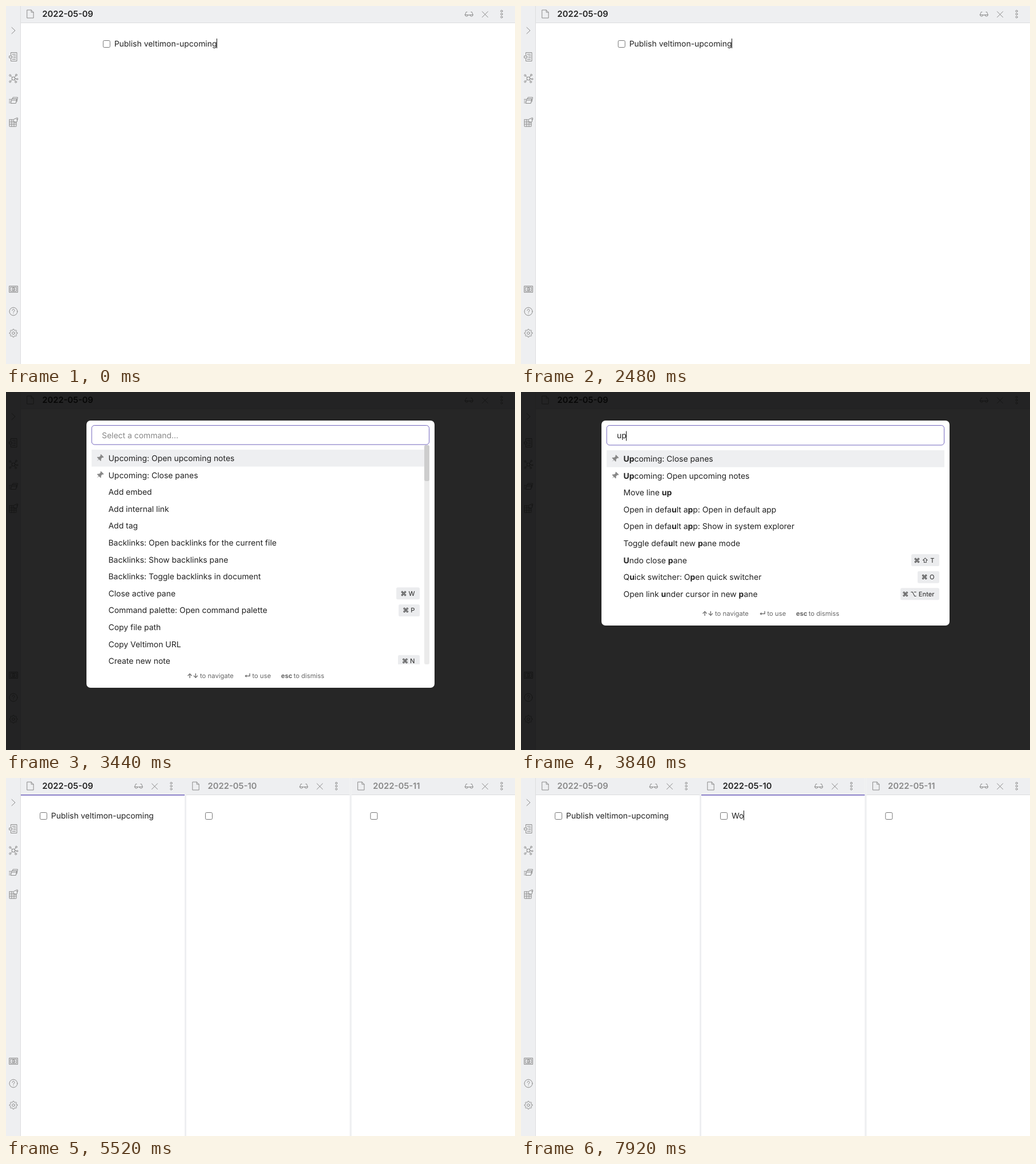
Recreate the animation shown at these times as an HTML page. Size 892 by 627 pixels, loop 8 s.

```html
<!DOCTYPE html>
<html lang="en">
<head>
<meta charset="utf-8">
<title>Upcoming notes</title>
<style>
html, body { margin: 0; height: 100%; overflow: hidden; background: #fff; }
svg { display: block; width: 892px; height: 627px; }
text { font: 13.94px Inter, "DejaVu Sans", sans-serif; fill: #222; text-rendering: geometricPrecision; }
.title { font-size: 14.8px; font-weight: 600; }
.hint { font-size: 11.3px; fill: #666; }
.key { font-size: 11.2px; text-anchor: end; }
.b { font-weight: 700; }
.dim { fill: #888; }
.icon { fill: none; stroke: #8a8a8a; stroke-linecap: round; stroke-linejoin: round; }
.box { fill: #fff; stroke: #767676; }
.caret { fill: #111; }
</style>
</head>
<body>
<svg id="stage" viewBox="0 0 892 627"></svg>
<script>
const stage = document.getElementById('stage');
const LOOP = 8000, ROW = 29.62;
const BAR = '#eeeff1', LINE = '#dcddde', ACCENT = '#7164bd';
const TASK = 'Publish veltimon-upcoming';

// Entries: label (asterisks mark matches), shortcut, left edge of shortcut box from the right
const ALL = [
  ['Upcoming: Open upcoming notes'], ['Upcoming: Close panes'], ['Add embed'],
  ['Add internal link'], ['Add tag'], ['Backlinks: Open backlinks for the current file'],
  ['Backlinks: Show backlinks pane'], ['Backlinks: Toggle backlinks in document'],
  ['Close active pane', '⌘ W', 41], ['Command palette: Open command palette', '⌘ P', 37],
  ['Copy file path'], ['Copy Veltimon URL'], ['Create new note', '⌘ N', 38]
];
const FOUND = [
  ['*Up*coming: Close panes'], ['*Up*coming: Open upcoming notes'], ['Move line *up*'],
  ['Open in defa*u*lt a*p*p: Open in default app'],
  ['Open in defa*u*lt a*p*p: Show in system explorer'],
  ['Toggle defa*u*lt new *p*ane mode'], ['*U*ndo close *p*ane', '⌘ ⇧ T', 49],
  ['Q*u*ick switcher: O*p*en quick switcher', '⌘ O', 38],
  ['Open link *u*nder cursor in new *p*ane', '⌘ ⌥ Enter', 68]
];

const rect = (x, y, w, h, fill, rx = 0) =>
  `<rect x="${x}" y="${y}" width="${w}" height="${h}" rx="${rx}" fill="${fill}"/>`;
const text = (x, y, s, cls = '') => `<text x="${x}" y="${y}" class="${cls}">${s}</text>`;
const path = (d, x = 0, y = 0) => `<path class="icon" d="${d}" transform="translate(${x} ${y})"/>`;
const ring = (x, y, r) => `<circle class="icon" cx="${x}" cy="${y}" r="${r}"/>`;
// Placed after the preceding text once that has been measured
const caret = (x, y, on) => on ? `<rect class="caret" data-x="${x}" y="${y}" width="1" height="17"/>` : '';

function gear(x, y) {
  const pts = [];
  for (let i = 0; i < 32; i++) {
    const r = i % 4 < 2 ? 7 : 5.3, a = (i - .5) * Math.PI / 16;
    pts.push((x + r * Math.cos(a)).toFixed(2) + ',' + (y + r * Math.sin(a)).toFixed(2));
  }
  return `<polygon class="icon" points="${pts.join(' ')}"/>` + ring(x, y, 2.3);
}

const sidebar = rect(0, 0, 26, 627, BAR) + rect(25, 0, 1, 627, LINE) +
  path('M10 37.5l6 5.5-6 5.5') +
  path('M8.5 86v-4.5h10.5v15h-10.5v-4M11 84.5h5.5M13 87.5h4M13 90.5h4M11 93.5h5.5M6 87.5h4.5v3.5h-4.5z') +
  path('M10.8 125l-2.5-2.5M15 125l2-3M10.8 129l-2.5 2.5M15 129.2l1.5 2.5M16 127.4l2.5.3') +
  ring(13, 127, 2.9) + ring(7.2, 121.5, 1.5) + ring(18, 120.8, 1.5) +
  ring(7.2, 132.5, 1.5) + ring(17.2, 133, 1.5) + ring(19.6, 128, 1.2) +
  path('M10.5 162.5h8.5l-1.8 8h-8.3zM11.5 162.5l.6-2.5h8.4l-1.7 8M10.5 165h8M5.5 163.5h3M5.5 166.5h2.5M5.5 169.5h2') +
  path('M6 199h6M6 199v12h12v-7M6 203h12M6 207h12M10 199v12M14 203v8M13.5 198.5l3-1.5 3 1.5v4l-3 2-3-2zM18 196h2.5v3') +
  path('M6 490.5h14.5v11h-14.5zM8 492.5h10.5v7h-10.5z') + ring(13.2, 496, 2.6) + ring(13.2, 496, .7) +
  ring(13, 535, 7) +
  path('M11 533.3a2 2 0 1 1 3 1.6q-1 .6-1 1.6M13 538.6v.1') +
  gear(13, 573);

function pane(left, right, date, active, underline) {
  return rect(left, 0, right - left, 627, '#fff') + rect(left, 0, right - left, 29, BAR) +
    rect(left, 29, right - left, underline ? 1.6 : 1, underline ? ACCENT : LINE) +
    path('M0 7h7l4 4v10h-11zM7 7v4h4', left + 11.2) +
    text(left + 37.5, 19.4, date, active ? 'title' : 'title dim') +
    path('M-7 15.5l2-5h1.5M7 15.5l-2-5h-1.5M-7 15.5h5.5a2.8 3.3 0 0 1-5.5 0zM1.5 15.5h5.5a2.8 3.3 0 0 1-5.5 0zM-1.5 16q1.5-1 3 0', right - 80.6) +
    path('M-5 10l10 10M5 10l-10 10', right - 52.5, -.3) +
    [9, 14.2, 19.4].map(y => ring(right - 23.5, y, 1.6)).join('');
}

const task = (x, label, on) =>
  `<rect class="box" x="${x}" y="60.5" width="12" height="12" rx="2"/>` +
  text(x + 19.4, 70.9, label) + caret(x + 19.4, 57, on);

const pin = y => `<path fill="#888" transform="translate(164.3 ${y}) rotate(45)" d="M-3.5-6.5h7v1.5l-1.3.8v3l2.3 2.5v1h-4l-.5 4.5-.5-4.5h-4v-1l2.3-2.5v-3l-1.3-.8z"/>`;

function row([label, key, keyWidth], i, top, right) {
  const y = top + i * ROW + ROW / 2;
  const marked = label.replace(/\*(.+?)\*/g, '<tspan class="b">$1</tspan>');
  return (i < 2 ? pin(y + .3) : '') + text(179.5, y + 5.1, marked) +
    (key ? rect(right - keyWidth, y - 10.5, keyWidth, 21, '#ebecee', 2.5) +
      text(right - 8.5, y + 4, key, 'key') : '');
}

function palette(t) {
  const typed = t < 3600 ? '' : t < 3760 ? 'u' : 'up';
  const found = typed === 'up';
  const list = found ? FOUND : ALL;
  const top = found ? 102 : 101, edge = found ? 742 : 733;
  const bottom = found ? 409 : 518, hintY = bottom - 17;
  const picked = t < 4720 ? 0 : 1;
  const since = t < 3600 ? t - 2720 : t < 3760 ? 0 : t - 3760;
  const blink = since % 1000 < 500;
  const h = found ? 34.5 : 33.6;
  const fresh = t < 2800;
  return rect(0, 0, 892, 627, 'rgba(0,0,0,.85)') +
    rect(141, 50, 610, bottom - 50, '#fff', 7) +
    `<rect x="150.2" y="58.5" width="591.4" height="${h}" rx="5" fill="#fff" stroke="${fresh ? '#777' : ACCENT}"/>` +
    (fresh ? `<path d="M154 58.5q-3.8 0-3.8 5v23q0 5 3.8 5.5" fill="none" stroke="${ACCENT}"/>` : '') +
    text(168, found ? 81 : 80.6, typed) + caret(168, found ? 68.5 : 67.5, blink) +
    (typed ? '' : text(168, 80.6, 'Select a command...', 'dim')) +
    `<clipPath id="view"><rect x="141" y="93" width="610" height="${found ? 280 : 384}"/></clipPath>` +
    '<g clip-path="url(#view)">' +
    rect(150, top + picked * ROW, edge - 150, ROW, BAR) +
    list.map((r, i) => row(r, i, top, edge - (found ? 9 : 8))).join('') + '</g>' +
    (found ? '' : rect(733, 93, 9, 384, '#ebebeb', 3) + rect(733, 93, 9, 63, '#cdcdcd', 3)) +
    text(317, hintY, '↑↓', 'hint b') + text(340, hintY, 'to navigate', 'hint') +
    text(417.5, hintY, '↵', 'hint b') + text(431.5, hintY, 'to use', 'hint') +
    text(482, hintY, 'esc', 'hint b') + text(504, hintY, 'to dismiss', 'hint');
}

function scene(t) {
  if (t < 5520) {
    const on = t < 480 || t >= 1040 && t < 1520 || t >= 2160 && t < 2720;
    return pane(26, 892, '2022-05-09', true, false) + sidebar + task(170.3, TASK, on) +
      (t >= 2720 ? palette(t) : '');
  }
  const second = t >= 6800;
  const typed = t < 7440 ? '' : t < 7600 ? 'W' : 'Wo';
  const on = second && (t < 7280 || t >= 7440);
  return rect(0, 0, 892, 627, BAR) +
    pane(26, 313, '2022-05-09', !second, !second) +
    pane(316, 602.4, '2022-05-10', second, second) +
    pane(605.6, 892, '2022-05-11', false, false) + sidebar +
    task(59.7, TASK, false) + task(349.5, typed, on) + task(638.8, '', false);
}

let shown = '';
function draw(now) {
  const next = scene(now % LOOP);
  if (next !== shown) {
    stage.innerHTML = shown = next;
    for (const c of stage.querySelectorAll('.caret')) {
      const width = c.previousElementSibling.getComputedTextLength();
      c.setAttribute('x', Math.round(+c.dataset.x + width - .5));
    }
  }
  requestAnimationFrame(draw);
}
draw(0);
</script>
</body>
</html>
```
